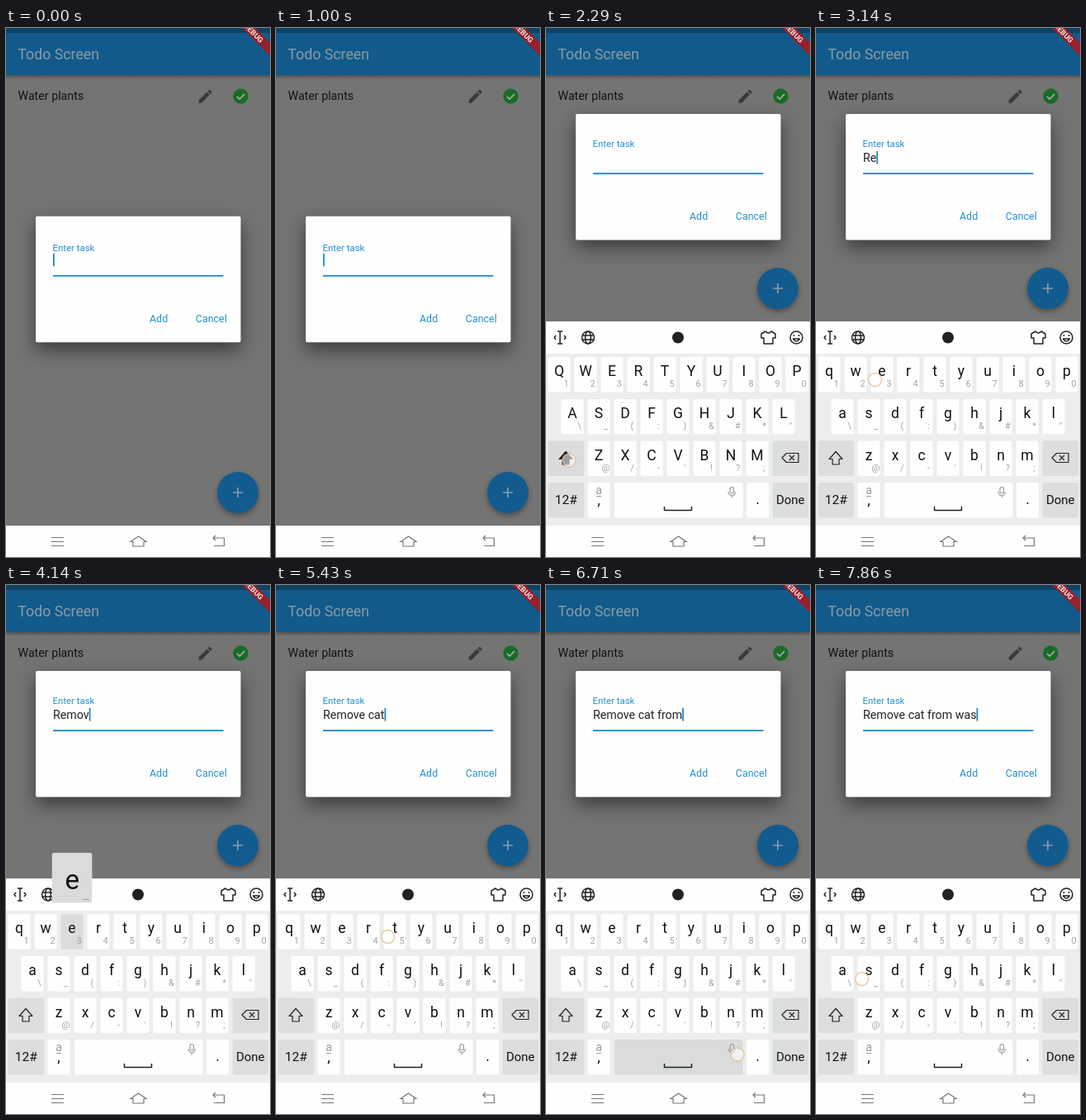
These frames come from a looping animation (320 by 640 pixels, 8 s). An HTML page:

```html
<!DOCTYPE html>
<html lang="en">
<head>
<meta charset="utf-8">
<title>Todo Screen</title>
<style>
  html, body { margin: 0; width: 100%; height: 100%; overflow: hidden; background: #747573; }
  svg { display: block; width: 320px; height: 640px; font-family: Roboto, sans-serif; }
  text { white-space: pre; }
  .mid { text-anchor: middle; }
  .sub { font-size: 11px; fill: #a2a4a3; text-anchor: middle; }
  .line { fill: none; stroke: #222; stroke-width: 1.5; stroke-linejoin: round; }
  .nav { fill: none; stroke: #777; stroke-width: 1.2; }
  .fab { filter: drop-shadow(0 3px 3px rgba(0,0,0,.35)); }
  .panel { filter: drop-shadow(0 9px 11px rgba(0,0,0,.5)); }
</style>
</head>
<body>
<svg id="stage" viewBox="0 0 320 640">
  <defs>
    <linearGradient id="barShade" x2="0" y2="1">
      <stop stop-opacity=".3"/><stop offset="1" stop-opacity="0"/>
    </linearGradient>
  </defs>
  <rect width="320" height="640" fill="#747573"/>
  <rect width="320" height="57" fill="#115a8b"/>
  <rect width="320" height="6" fill="#0d4264"/>
  <rect y="57" width="320" height="5" fill="url(#barShade)"/>
  <text x="14.3" y="38" font-size="17.78" fill="#8b9ba5">Todo Screen</text>
  <text x="14.5" y="87" font-size="14.22" fill="#111">Water plants</text>
  <path transform="translate(231 72) scale(.889)" fill="#393a39" d="M3 17.25V21h3.75L17.81 9.94l-3.75-3.75zM20.71 7.04c.39-.39.39-1.02 0-1.41l-2.34-2.34c-.39-.39-1.02-.39-1.41 0l-1.83 1.83 3.75 3.75z"/>
  <circle cx="284.5" cy="82.5" r="9.2" fill="#1a6b28"/>
  <path d="M280 82.8l3.2 3.2 6-6.2" fill="none" stroke="#a5aaa5" stroke-width="1.7"/>

  <g id="fab">
    <circle class="fab" cx="281" cy="562" r="25" fill="#125b8f"/>
    <path d="M275 562h12M281 556v12" stroke="#8a9ca8" stroke-width="1.7"/>
  </g>

  <g id="dialog">
    <rect class="panel" x="36" y="104" width="248.5" height="152.5" rx="2" fill="#fefefe"/>
    <text id="label" x="56.5" font-size="11.4" fill="#2490cf">Enter task</text>
    <text id="entry" x="57" y="161.5" font-size="14.22" fill="#222"></text>
    <rect id="caret" y="149" width="1.8" height="15.5" fill="#2185c4"/>
    <rect x="57" y="175.2" width="206.5" height="1.8" fill="#2188c6"/>
    <g font-size="12.44" fill="#2490cf">
      <text x="174" y="232">Add</text>
      <text x="229.8" y="232">Cancel</text>
    </g>
  </g>

  <g id="keyboard">
    <rect y="355" width="320" height="247" fill="#eceeed"/>
    <rect y="355" width="320" height="39" fill="#fefefe"/>
    <g class="line">
      <path d="M17 367v15M14 367h6M14 382h6"/>
      <path d="M12 372l-2 2.5 2 2.5M22 372l2 2.5-2 2.5"/>
      <circle cx="51" cy="374.5" r="7.5"/><ellipse cx="51" cy="374.5" rx="3.4" ry="7.5"/>
      <path d="M44 372h14M44 377h14"/>
      <path d="M266 367l-5 3v5h3v7h11v-7h3v-5l-5-3q-3.500 4-7 0z"/>
      <circle cx="303.500" cy="374.500" r="7.500"/>
      <path d="M299.500 376q4 6 8 0z"/>
      <path d="M300.500 371v2M306.500 371v2"/>
    </g>
    <circle cx="160" cy="374.500" r="7" fill="#222"/>
    <g id="keys"></g>
    <path id="arrow" class="line" style="stroke-width:1.200" d="M24 512.500l8 9h-4v6.500h-8v-6.500h-4z"/>
    <path class="line" style="stroke-width:1.200" d="M286 520l5.500-5.500h14.500v11h-14.500zM295 517l6 6M301 517l-6 6"/>
    <path class="line" d="M143.500 579v4.500h33V579"/>
    <g fill="none" stroke="#999" stroke-width="1.100">
      <rect x="223" y="555.500" width="4.500" height="7.500" rx="2.200"/>
      <path d="M221 561q0 4.500 4.200 4.500t4.200-4.500M225.200 565.500v3"/>
    </g>
  </g>

  <g id="popup">
    <rect width="48.500" height="60.500" rx="2.500" fill="#dadcdb"/>
    <text id="popupLetter" class="mid" x="24.500" y="43.500" font-size="33" fill="#111"></text>
    <text class="mid" x="41" y="57" font-size="10" fill="#333">...</text>
  </g>
  <circle id="touch" r="8" fill="#fff" fill-opacity=".6" stroke="#e5bd8c" stroke-opacity=".8" stroke-width="1.500"/>

  <rect y="602" width="320" height="38" fill="#fefefe"/>
  <g class="nav">
    <path d="M55 616.500h15M55 621.500h15M55 626.500h15"/>
    <path d="M151 621.500l9.500-6.500 9.500 6.500h-3v5.500h-13v-5.500z"/>
    <path d="M254 614l-3 3 3 3M251 617h13.500v9.500H252"/>
  </g>
  <g transform="translate(300.300 6) rotate(45)">
    <rect x="-40" y="-5.700" width="80" height="11.400" fill="#94212b"/>
    <text class="mid" y="3.200" font-size="9" font-weight="700" fill="#f3e6e6">DEBUG</text>
  </g>
</svg>
<script>
const LOOP = 8000, STEP = 1000 / 7;
const $ = id => document.getElementById(id);
const keys = {};

function add(tag, attrs, content = '') {
  const node = document.createElementNS('http://www.w3.org/2000/svg', tag);
  for (const name in attrs) node.setAttribute(name, attrs[name]);
  node.textContent = content;
  return $('keys').appendChild(node);
}

function addKey(name, x, y, width, fill, label = '', size = 17.5) {
  const box = add('rect', { x, y, width, height: 42.5, rx: 2.5, fill });
  const cx = x + width / 2;
  const text = add('text', { x: cx, y: y + 23, 'font-size': size, class: 'mid', fill: '#111' }, label);
  keys[name] = { box, text, cx, y, fill };
}

function addLetters(letters, hints, firstX, y) {
  [...letters].forEach((letter, i) => {
    const cx = firstX + 32 * i;
    addKey(letter, cx - 13.5, y, 27, '#fefefe', letter);
    add('text', { x: cx + 8.5, y: y + 36, class: 'sub' }, hints[i]);
  });
}

const GREY = '#dbdedc', WHITE = '#fefefe';
addLetters('qwertyuiop', '1234567890', 16, 398);
addLetters('asdfghjkl', '\\_(:)&#*"', 32, 449);
addLetters('zxcvbnm', "@/-'!?;", 64, 499.5);
addKey('shift', 2.5, 499.5, 43.5, GREY);
addKey('delete', 274.5, 499.5, 43.5, GREY);
addKey('symbols', 2.5, 550, 43.5, GREY, '12#', 15.5);
addKey('comma', 50.5, 550, 27, WHITE, ',');
keys.comma.text.setAttribute('y', 577);
add('text', { x: 64, y: 564, class: 'mid', 'font-size': 14, fill: '#999' }, 'a');
add('path', { d: 'M61 566.500h6', stroke: '#999' });
addKey(' ', 83, 550, 155.5, WHITE);
addKey('period', 243, 550, 27, WHITE, '.');
addKey('done', 274.5, 550, 43.5, GREY, 'Done', 15);
for (const name of ['symbols', 'done', 'period']) keys[name].text.setAttribute('y', 576);

// Steps at which the keys of the typed phrase go down.
const SHIFT_AT = 15;
const phrase = 'Remove cat from was';
const pressAt = [19, 21, 23, 25, 27, 29, 31, 33, 35, 37, 39, 41, 43, 44, 45, 46, 50, 52, 54];
const presses = [{ key: 'shift', at: SHIFT_AT },
  ...pressAt.map((at, i) => ({ key: phrase[i].toLowerCase(), at }))];
const isWide = key => key === ' ' || key === 'shift';
const touchSpots = { shift: [28, 523], ' ': [232, 568] };

const show = (node, on) => node.setAttribute('visibility', on ? 'visible' : 'hidden');
const shiftY = (id, y) => $(id).setAttribute('transform', `translate(0 ${y})`);

function draw(time) {
  const step = Math.floor((time + 5) / STEP);
  const raised = step >= 11;
  const hidden = Math.min(1, Math.max(0, (11 - step) / 2));
  const upper = step > SHIFT_AT && step <= pressAt[0];

  shiftY('keyboard', 247 * hidden * hidden);
  shiftY('dialog', raised ? 0 : 123.7);
  shiftY('fab', raised ? -247 : 0);
  $('label').setAttribute('y', raised ? 144 : 146);

  const typed = pressAt.filter((at, i) => step > at + (phrase[i] === ' ' ? 1 : 0)).length;
  $('entry').textContent = phrase.slice(0, typed);
  $('caret').setAttribute('x', 57 + (typed ? $('entry').getComputedTextLength() : 0));
  show($('caret'), typed > 0 || (time + 300) % 1000 < 500);

  for (const name in keys) {
    const { box, text, fill } = keys[name];
    box.setAttribute('fill', fill);
    if (name.length === 1) text.textContent = name === ' ' ? '' : upper ? name.toUpperCase() : name;
  }
  $('arrow').style.fill = upper ? '#111' : 'none';

  const down = presses.find(p => step === p.at || (isWide(p.key) && step === p.at + 1));
  if (down) keys[down.key].box.setAttribute('fill', '#d9dcda');
  const popped = down && !isWide(down.key);
  show($('popup'), popped);
  if (popped) {
    const { cx, y } = keys[down.key];
    const left = Math.min(271, Math.max(0, cx - 24.2));
    $('popup').setAttribute('transform', `translate(${left} ${y - 74})`);
    $('popupLetter').textContent = upper ? down.key.toUpperCase() : down.key;
  }

  const lifted = presses.find(p => step === p.at + 1);
  show($('touch'), lifted);
  if (lifted) {
    const { cx, y } = keys[lifted.key];
    const [x, ty] = touchSpots[lifted.key] || [cx - 8.5, y + 27.5];
    $('touch').setAttribute('cx', x);
    $('touch').setAttribute('cy', ty);
  }
}

const start = performance.now();
function tick() {
  draw((performance.now() - start) % LOOP);
  requestAnimationFrame(tick);
}
tick();
</script>
</body>
</html>
```
